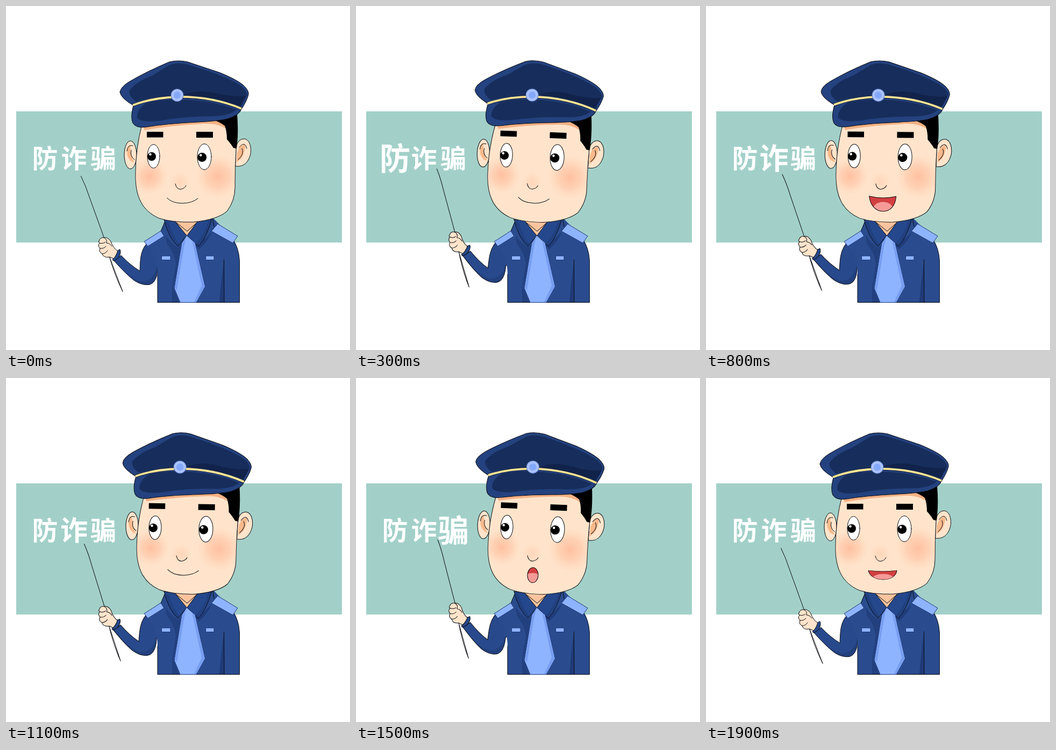
These frames come from a looping animation (640 by 640 pixels, 2000 ms). An HTML page:

```html
<!DOCTYPE html>
<html lang="zh">
<head>
<meta charset="utf-8">
<title>防诈骗</title>
<style>
html, body { margin: 0; width: 100%; height: 100%; overflow: hidden; background: #fff; }
svg { display: block; width: 100vw; height: 100vh; }
text { font: 700 48px "Noto Sans CJK SC", "Noto Sans CJK", "Noto Sans CJK JP", sans-serif; fill: #fff; text-anchor: middle; }
.ink { stroke: #0b0b12; stroke-width: 1; stroke-linejoin: round; stroke-linecap: round; }
.line { fill: none; }
.skin { fill: #ffe4cb; }
.navy { fill: #284a8c; }
.deep { fill: #1d3672; }
.sky { fill: #8fb4ff; stroke: #1c3577; }
.dark { fill: #172e5c; }
</style>
</head>
<body>
<svg viewBox="0 0 640 640">
  <defs>
    <radialGradient id="blush">
      <stop offset="0" stop-color="#ffb795" stop-opacity=".8"/>
      <stop offset=".5" stop-color="#ffbe9e" stop-opacity=".5"/>
      <stop offset="1" stop-color="#ffd0b2" stop-opacity="0"/>
    </radialGradient>
    <path id="face" d="M253 220Q241 266 241 312C240 354 253 381 285 395Q310 403 348 402Q392 398 411 382Q426 362 426 338Q426 300 428 268L425 210Z"/>
    <clipPath id="cheeks"><use href="#face"/></clipPath>
    <clipPath id="round"><ellipse cx="326.400" cy="367" rx="10" ry="14"/></clipPath>
    <clipPath id="grin"><path d="M-25 0Q0 6 25 0C24 18 14 28 1 28S-23 18-25 0Z"/></clipPath>
  </defs>
  <rect x="19" y="196" width="606" height="244" fill="#a2d0c9"/>
  <g id="words"></g>

  <g id="arm">
    <path class="ink line" d="M139.500 316.500Q149 336 155 355L182 430"/>
    <path class="ink line" d="M192 465Q202 501 217 531M193 468L217 531"/>
    <path class="ink skin" d="M173 437Q175 430 182 431Q189 429 195 438Q199 450 208 456L209 460L203 471L193 467Q181 469 179 461Q172 458 175 451Q170 446 174 441Q171 439 173 437Z"/>
    <path class="ink line" d="M174 441Q181 443 185 439M175 451Q182 452 186 447M179 461Q185 461 189 455M182 431Q189 434 187 441Q193 441 197 447"/>
    <path class="ink navy" d="M287 424Q264 437 258 447C249 461 250 477 249 493Q231 482 214 464L201 474Q223 499 239 511Q253 520 266 518.500C278 516 282 502 282 486L300 470Z"/>
    <path class="deep" opacity=".5" d="M205 477Q232 508 252 512Q270 513 279 493L281 482Q283 517 263 518Q247 518 230 504Z"/>
    <path class="ink navy" d="M212 453Q214 456 212 463Q208 472 200 474L198 472Q205 466 208 455Z"/>
  </g>

  <g id="body">
    <path fill="#2a4c8e" d="M297 397L288 419L262 445Q282 466 282 500V551.500H434.500V474Q433 447 420 430L384 393Z"/>
    <path class="deep" opacity=".55" d="M297 426Q305 440 320 449L326 444L316 500L311 523L322 551H309V524L316 480Q314 460 299 442Z"/>
    <path class="deep" opacity=".7" d="M383 420Q376 438 359 453L352 445L373 430Z"/>
    <path class="deep" opacity=".8" d="M406 472Q400 510 397 551H406Z"/>
    <path class="ink line" d="M282 499V551.500H434.500V474Q433 449 422 435M406 551L405.500 472M297 398L288 419M384 393L387 410"/>
    <path fill="#fbc49e" d="M311 397L337 428L360 397Z"/>
    <path class="ink" fill="#25488d" d="M294 397L314 400L336 427L320 447Q303 433 294 397Z"/>
    <path class="ink" fill="#25488d" d="M384 392L357 400L337 427L358 447Q374 430 384 392Z"/>
    <path class="dark" opacity=".3" d="M296 400L302 401Q310 426 322 443L320 446Q303 432 296 400ZM382 396Q374 426 357 445L353 441Q371 423 377 397Z"/>
    <path class="ink line" d="M317 403L337 419L355 403"/>
    <path class="ink sky" d="M336 427L327 441L313 525L324 551.500H354L370.500 522L352 441Z"/>
    <path fill="#779ef0" d="M335 430L328 442L314 524L318 529L331 449ZM346 436L351 442L370 522L354 551H350L364 520Z"/>
    <path class="ink sky" d="M257.500 438L288 418.500L294 428L264 447Z"/>
    <path class="ink sky" d="M394 405.500L431 428L422 441L382.500 419Z"/>
    <path class="ink sky" d="M290 465H306V472.500H290ZM372 465H387V472.500H372Z"/>
  </g>

  <g id="head">
    <ellipse class="ink skin" cx="231.500" cy="277" rx="11.500" ry="26"/>
    <path fill="#f9b98b" d="M231 258Q223 266 226 279Q231 291 239 291Q231 280 231 258Z"/>
    <path class="ink line" d="M236 260Q226 257 225 270M233 268Q230 279 239 286"/>
    <path class="ink skin" d="M428 262Q432 247 443 247C453 248 457 262 455 275C451 292 441 300 427 298Z"/>
    <path fill="#f9b98b" d="M430 274Q434 259 445 257Q446 270 438 283L429 291Z"/>
    <path class="ink line" d="M434 263Q444 250 448 265M439 265Q444 275 432 286"/>
    <use href="#face" class="ink skin"/>
    <path fill="#f6b184" d="M256 224L390 213Q404 215 409 228Q394 218 370 219Q310 222 257 231Z"/>
    <path d="M386 212Q400 217 407 223Q411 233 411 248Q419 257 423 264L429 265Q433 238 430 200Z"/>
    <g clip-path="url(#cheeks)" fill="url(#blush)">
      <circle cx="267" cy="317" r="35"/>
      <circle cx="394" cy="317" r="42"/>
      <circle cx="324" cy="327" r="20" opacity=".4"/>
    </g>
    <path d="M262 234H292.500V244.500H262ZM354 234H385V245H354Z"/>
    <g id="eyes"></g>
    <path class="ink line" d="M315 331Q317 341 325 341Q333 339 335 334"/>
    <path class="ink line" id="smile" d="M299.500 357Q309 367 328 367Q346 367 357 358"/>
    <g id="oh">
      <g clip-path="url(#round)">
        <rect x="314" y="350" width="26" height="34" fill="#d33f40"/>
        <path fill="#f59b97" d="M314 366Q326 360 340 366V384H314Z"/>
      </g>
      <ellipse class="ink line" cx="326.400" cy="367" rx="10" ry="14"/>
    </g>
    <g id="open">
      <g clip-path="url(#grin)">
        <rect x="-28" y="-2" width="56" height="34" fill="#d33f40"/>
        <ellipse cx="1" cy="23" rx="18" ry="12.500" fill="#f59b97"/>
      </g>
      <path class="ink line" d="M-25 0Q0 6 25 0C24 18 14 28 1 28S-23 18-25 0Z"/>
    </g>

    <path class="ink" fill="#24427f" d="M212 160Q213 151 229 141Q261 122 304 104Q320 100 338 104L398 124Q437 140 446 152Q452 159 451 165Q448 177 438 192Q434 203 412 210Q396 214 356 216Q296 219 262 225Q242 228 236 218Q231 207 237 185Q213 171 212 160Z"/>
    <path class="dark" d="M242 178Q227 167 230 157Q242 141 271 130L304 110Q319 104 338 109Q398 126 432 145Q449 156 448 166L437 186Q377 164 318 167Q276 168 242 178Z"/>
    <path fill="#11234b" d="M332 165Q357 154 390 162Q423 170 447 167L437 187Q390 169 332 165Z"/>
    <path class="dark" d="M244 208Q243 193 260 181Q282 174 318 174Q383 174 429 193Q418 203 390 205Q341 205 301 211Q253 220 244 208Z"/>
    <path class="line" stroke="#141b35" stroke-width="5.500" d="M236 184.500Q271 171 318 169Q384 168 438 191"/>
    <path class="line" stroke="#ffe697" stroke-width="3.800" d="M236 184.500Q271 171 318 169Q384 168 438 191"/>
    <circle cx="318.500" cy="166" r="11.500" fill="#abc3fc" stroke="#6483d0"/>
    <circle cx="318.500" cy="166" r="6.700" fill="#84a8fb"/>
  </g>
</svg>
<script>
const $ = id => document.getElementById(id);
const set = (id, value) => $(id).setAttribute("transform", value);
const show = (id, on) => { $(id).style.display = on ? "" : "none"; };

const STEP = 100, STEPS = 20;
// lean of the head and arm at each step, 0 = left, 1 = right
const LEAN = [0, .32, .63, .87, 1, 1, .8, .48, .2, 0, .23, .49, .72, .92, 1, 1, .82, .5, .2, 0];
const WORD_X = [72.5, 126.5, 181], WORD_Y = 283;

$("words").innerHTML = [..."防诈骗"].map((c, i) => `<text id="w${i}" y="18">${c}</text>`).join("");

const eye = (x, y, rx, ry, px, py, r) =>
  `<ellipse class="ink" cx="${x}" cy="${y}" rx="${rx}" ry="${ry}" fill="#fff"/>
   <circle cx="${px}" cy="${py}" r="${r}"/>
   <circle cx="${px - 2.5}" cy="${py - 4}" r="2.3" fill="#fff"/>`;
$("eyes").innerHTML = eye(274.5, 279.5, 11.5, 22, 271, 280, 8) + eye(369, 280.5, 13, 24, 364.7, 281.5, 8.5);

function draw(ms) {
  const step = Math.floor(ms / STEP) % STEPS;
  const lean = LEAN[step];
  set("head", `rotate(${2.25 * lean} 333 433)`);
  set("arm", `rotate(${5.3 * lean} 313 445)`);

  // each word swells in turn for six steps
  WORD_X.forEach((x, i) => {
    const pulse = Math.max(0, 1 - Math.abs(step - 3 - 6 * i) / 3);
    set("w" + i, `translate(${x} ${WORD_Y}) scale(${1 + .2 * pulse})`);
  });

  const beat = step % 10;
  show("smile", beat < 4);
  show("oh", beat >= 4 && beat < 7);
  show("open", beat >= 7);
  set("open", beat === 8 ? "translate(328 354)" : "translate(328.5 358) scale(1.06 .61)");
}

function tick() {
  draw(performance.now());
  requestAnimationFrame(tick);
}
tick();
</script>
</body>
</html>
```
